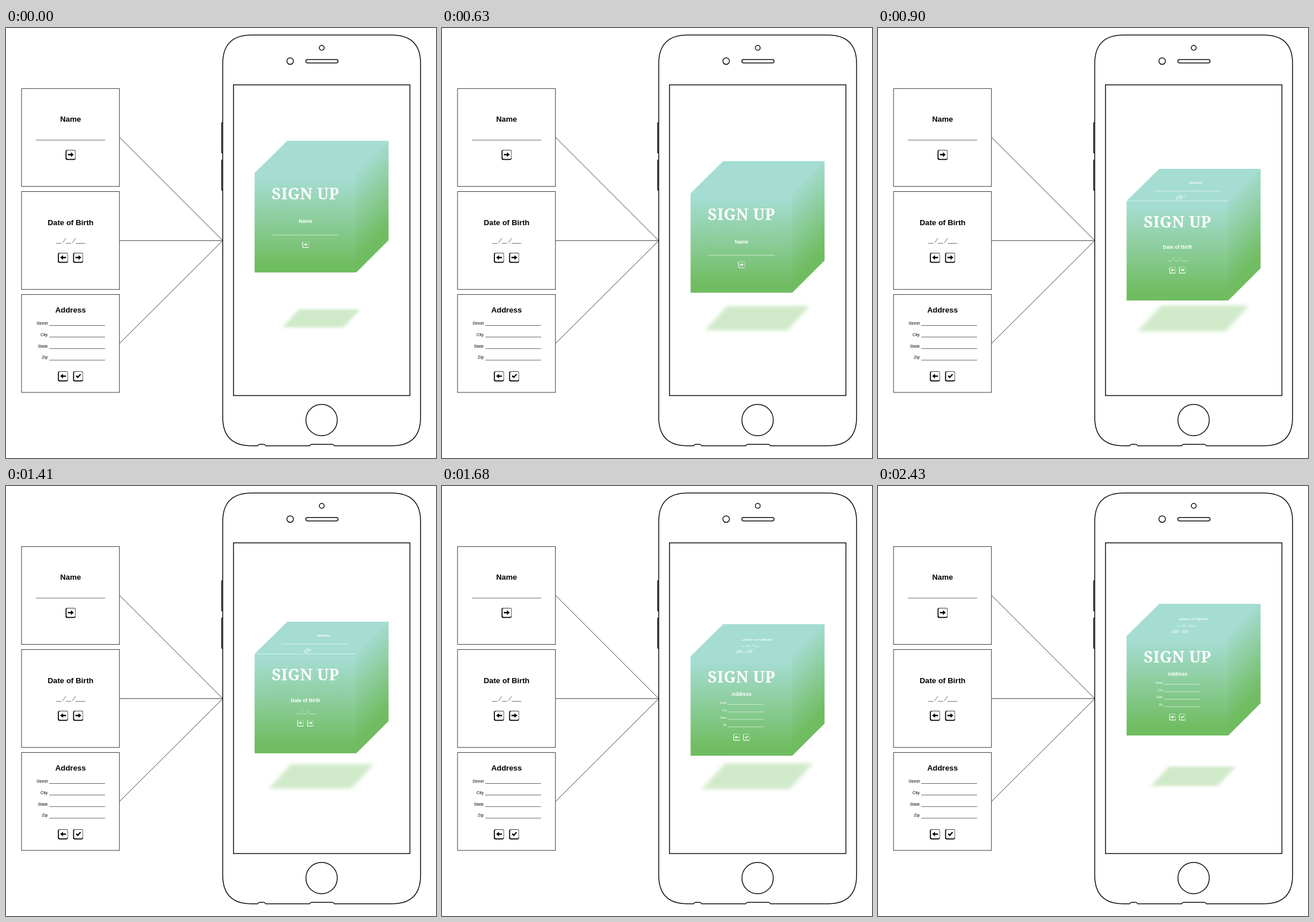
These frames come from a looping animation (748x748 px, 2460 ms). An HTML page:

```html
<!DOCTYPE html>
<html lang="en">
<head>
<meta charset="utf-8">
<title>Sign up cube</title>
<style>
  html, body { margin: 0; width: 100%; height: 100%; overflow: hidden; background: #fff; }
  svg { display: block; width: 100%; height: 100%; }
  text { font-family: "Liberation Sans", Arial, sans-serif; fill: currentColor; }
  .title { font-size: 13.3px; font-weight: 700; text-anchor: middle; }
  .label { font-size: 7.3px; text-anchor: end; }
  .sign { font: 700 27.5px "Noto Serif", serif; text-anchor: middle; }
  .rule { fill: none; stroke: currentColor; stroke-width: .8; stroke-opacity: .75; vector-effect: non-scaling-stroke; }
  .key { fill: currentColor; }
  .ink { color: #000; }
  .white { color: #fff; }
  .frame { fill: none; stroke: #3a3a3a; stroke-width: 1; }
  .phone { fill: none; stroke: #111; stroke-width: 1.5; }
</style>
</head>
<body>
<svg viewBox="0 0 748 748">
  <defs>
    <linearGradient id="front" gradientUnits="userSpaceOnUse" x1="0" y1="56" x2="0" y2="229">
      <stop offset=".05" stop-color="#a5ddd2"/>
      <stop offset=".93" stop-color="#70bc60"/>
    </linearGradient>
    <linearGradient id="side" gradientUnits="userSpaceOnUse" x1="609" y1="56" x2="685" y2="132">
      <stop offset="0" stop-color="#a3dbce"/>
      <stop offset="1" stop-color="#70bc60"/>
    </linearGradient>
    <filter id="soft" x="-5%" y="-5%" width="110%" height="110%"><feGaussianBlur stdDeviation=".45"/></filter>
    <filter id="haze" x="-20%" y="-40%" width="140%" height="180%"><feGaussianBlur stdDeviation="4.2 3.4"/></filter>
  </defs>

  <g class="frame">
    <rect x="27" y="105.3" width="170.3" height="170.3"/>
    <rect x="27" y="284.5" width="170.3" height="170.3"/>
    <rect x="27" y="463.6" width="170.3" height="170.3"/>
    <path d="M197.3 190 377 369.8 197.3 549M197.3 369.8H377"/>
  </g>
  <g id="cards" class="ink"></g>

  <g class="phone">
    <path d="M427 12.3H671Q721.2 12.3 721.2 62V677Q721.2 726.8 671 726.8H571.5Q570 724.2 567.5 724.2H532Q529.500 724.2 528 726.8H452Q450.500 724.200 448 724.2H441.500Q439 724.2 437.500 726.8H427Q377 726.8 377 677V62Q377 12.3 427 12.3Z"/>
    <rect x="395.700" y="98.900" width="306.900" height="540.500"/>
    <circle cx="549" cy="682" r="27.300"/>
    <circle cx="549.300" cy="34.500" r="4.200"/>
    <circle cx="494.300" cy="57.600" r="5.700"/>
    <rect x="521.600" y="54.700" width="56" height="6" rx="3"/>
    <path d="M377 165H375.300V217H377M377 230H375.300V282H377"/>
  </g>

  <path id="shadow" d="M-56 -22.500H97L56 22.500H-97Z" fill="#d0eac9" filter="url(#haze)"/>
  <g id="cube" filter="url(#soft)">
    <path d="M489.300 0H665.300V173L609 229H432.400V56Z" fill="url(#front)"/>
    <path d="M609 56 665.300 0V173L609 229Z" fill="url(#side)"/>
    <g class="white">
      <text class="sign" x="521" y="102.200" letter-spacing=".3">SIGN UP</text>
      <g id="faces"></g>
    </g>
  </g>
</svg>
<script>
const $ = id => document.getElementById(id);

const title = s => `<text class="title" y="4.8">${s}</text>`;
const rule = d => `<path class="rule" d="${d}"/>`;

const ARROW = 'M-5 -1.2H.2V-4L5.200 0 .2 4V1.200H-5Z';
const CHECK = 'M-4.400 .3-2.700 -1.500-1 .4 3.200 -4 4.700 -2.500-1 3.700Z';
const KEY = 'M-6 -8.700H6Q8.700 -8.700 8.700 -6V6Q8.700 8.700 6 8.700H-6Q-8.700 8.700 -8.700 6V-6Q-8.700 -8.700 -6 -8.700Z' +
  'M-5.200 -8Q-7 -8 -7 -6V5Q-7 7 -5 7H6Q8.100 7 8.100 5V-6Q8.100 -8 6 -8Z';

function key(x, y, icon, flip = 1) {
  return `<g class="key" transform="translate(${x} ${y})"><path fill-rule="evenodd" d="${KEY}"/>` +
    `<path d="${icon}" transform="translate(.4 -.4) scale(${flip} 1)"/></g>`;
}
const keys = (y, next) => key(-13.3, y, ARROW, -1) + key(13.1, y, next);

// Forms are laid out around the centre of their title.
const nameForm = half => title('Name') + rule(`M${-half} 37H${half}`) + key(0, 62.7, ARROW);

const birthForm = title('Date of Birth') +
  rule('M-25 37h9M-14 36l6 -8M-8 37h9M3 36l6 -8M9 37h16.500') + keys(62, ARROW);

const addressForm = title('Address') +
  ['Street', 'City', 'State', 'Zip'].map((s, i) =>
    `<text class="label" x="-39.8" y="${25.7 + 19.9 * i}">${s}</text>` +
    rule(`M-37 ${27.5 + 20.1 * i}H60`)).join('') + keys(116, CHECK);

const place = (form, x, y) => `<g transform="translate(${x} ${y})">${form}</g>`;
const onFront = (form, y) => `<g transform="translate(521 ${y}) scale(.647)">${form}</g>`;
const onTop = (form, x, y, s) =>
  `<g transform="matrix(.647 0 ${-1.07 * s} ${s} ${x} ${y})">${form}</g>`;

$('cards').innerHTML = place(nameForm(60.3), 112.3, 158) +
  place(birthForm, 112.3, 337.7) + place(addressForm, 112.3, 490);

const faces = [
  onFront(nameForm(89), 140),
  onFront(birthForm, 136.3) + onTop(nameForm(89), 553, 24, .4) + rule('M432.400 56H609'),
  onFront(addressForm, 122) + onTop(birthForm, 549.3, 26.8, .33)
];
$('faces').innerHTML = faces.map(f => `<g>${f}</g>`).join('');
const faceNodes = [...$('faces').children];

const STEP = 30, STEPS = 82, RAMP = 5, RISE = 44;
const peaks = [0, 25, 51, STEPS];
const drop = [0, 4.7, 0];   // the middle face rests slightly lower

function draw(ms) {
  const k = Math.floor(ms / STEP) % STEPS;
  const lift = Math.max(...peaks.map(p => 1 - Math.abs(k - p) / RAMP), 0);
  const face = k < peaks[1] ? 0 : k < peaks[2] ? 1 : 2;
  const y = 240.2 - RISE * lift + drop[face];
  $('cube').setAttribute('transform', `translate(0 ${y.toFixed(2)})`);
  $('shadow').setAttribute('transform', `translate(548.5 505) scale(${(1 - .3 * lift).toFixed(3)})`);
  faceNodes.forEach((n, i) => n.setAttribute('display', i === face ? 'inline' : 'none'));
}

const start = performance.now();
function tick() {
  draw(performance.now() - start);
  requestAnimationFrame(tick);
}
tick();
</script>
</body>
</html>
```
